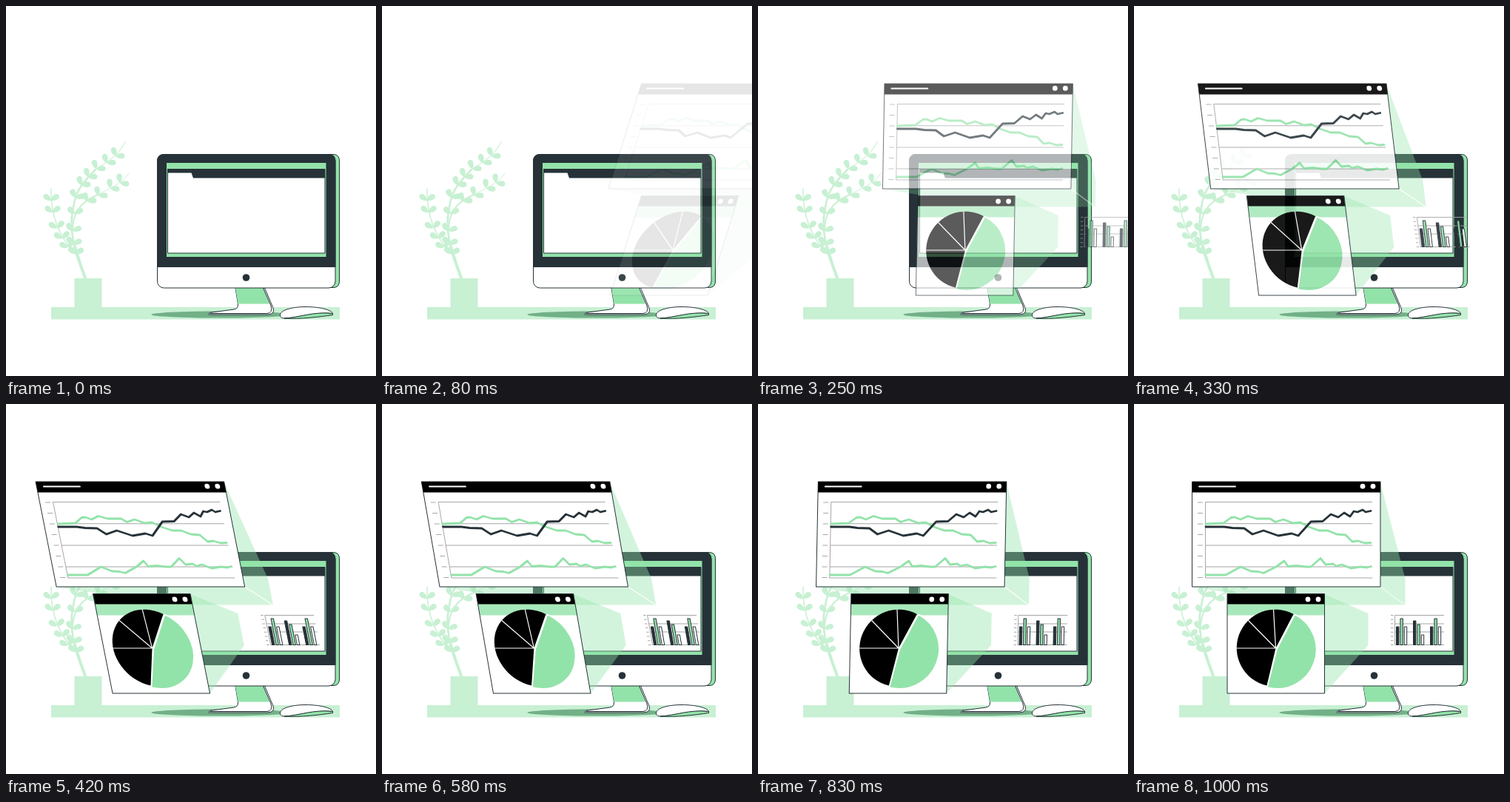
An HTML page for the animation above (1040 ms loop, 500 by 500 pixels).

```html
<!DOCTYPE html>
<html lang="en">
<head>
<meta charset="utf-8">
<title>Desktop dashboard</title>
<style>
html, body { margin: 0; width: 100%; height: 100%; overflow: hidden; background: #fff; }
svg { display: block; width: 100%; height: 100%; }
.d { fill: #263238; }
.g { fill: #92e3a9; }
.w { fill: #fff; }
.ink { stroke: #263238; stroke-width: 1; stroke-linejoin: round; }
.line { fill: none; stroke-width: 2.8; stroke-linecap: round; stroke-linejoin: round; }
.thin { fill: none; stroke: #a6a6a6; stroke-width: 1; }
.stem { fill: none; stroke: #92e3a9; stroke-linecap: round; }
</style>
</head>
<body>
<svg viewBox="0 0 500 500">
  <g opacity=".5">
    <path class="g" d="M61 407H451V423.5H61Z M92.5 368H129.5V412H92.5Z"/>
    <path class="stem" stroke-width="4" d="M107.500 369C103 355 97 342 93 325"/>
    <path class="stem" stroke-width="2.6" d="M94 330C87 305 88 285 91 272C94 250 104 238 121 221"/>
    <path class="stem" stroke-width="1.1" d="M121 221C137 210 151 203 161 184"/>
    <path class="stem" stroke-width="2" d="M90 303C90 280 100 265 124 255"/>
    <path class="stem" stroke-width="1" d="M124 255C140 246 156 241 166 226"/>
    <path class="stem" stroke-width="1.5" d="M100 341C80 322 60 295 61 247"/>
    <g id="leaves" class="g"></g>
  </g>

  <ellipse cx="290" cy="417" rx="93.500" ry="4.500" fill="#72b088"/>

  <g class="ink">
    <path class="w" d="M310 381L313.500 403Q314 409 308 410L278 414Q273 415 274.500 417H354Q364 416 361 408L349.500 381Z"/>
    <path class="g" stroke="none" d="M310 381H348L356 402.500H313.500Z"/>
    <path fill="none" d="M347.500 381L358 405Q361 414.500 353 415.500H276"/>
    <path class="g" d="M436 200.500H442Q450.500 200.500 450.500 209V372Q450.500 380.500 442 380.500H436Z"/>
    <rect class="w" x="204.500" y="200.500" width="240.500" height="180.500" rx="9"/>
    <path class="d" d="M204.500 352.500V209.500Q204.500 200.500 213.500 200.500H436Q445 200.500 445 209.500V352.500Z"/>
  </g>
  <rect class="g" x="217" y="212" width="215.500" height="127"/>
  <rect class="w ink" x="218.500" y="220.500" width="212.500" height="113.500"/>
  <path class="d" d="M218 220H431V232.500H253L250.500 225.500H218Z"/>
  <circle class="d" cx="324.500" cy="367" r="4.800"/>

  <g class="ink">
    <path class="w" d="M370.500 417C372 410 389 406.500 405 406.500C424 406.500 440 410.500 441.500 415.500C420 413 397 421 377 422C372 422 370 420 370.500 417Z"/>
    <path class="g" d="M376 422C397 421 415 412.500 441.500 415.500V417.500C425 420 397 423.500 376 422Z"/>
  </g>

  <g id="panels">
    <g class="g" fill-opacity=".4">
      <path d="M78.500 247L228 271.500H366.500V236L333 106V247Z"/>
      <path d="M257.500 257L316.500 283V326L257.500 391Z"/>
    </g>
    <path stroke="#fff" d="M333 247L366 271.500"/>

    <rect class="w ink" x="78.500" y="105" width="254.500" height="142"/>
    <path d="M78.500 105H333V119.500H78.500Z"/>
    <path stroke="#fff" stroke-width="1.800" stroke-linecap="round" d="M88 111.500H137"/>
    <g class="w">
      <circle cx="309" cy="111.200" r="3.400"/><circle cx="323" cy="111.200" r="3.400"/>
      <circle cx="235" cy="264" r="3.400"/><circle cx="249" cy="264" r="3.400"/>
    </g>
    <path class="thin" d="M322 132.500H96.500V235H322M96.500 161.700H322M96.500 191H322M96.500 220H322"/>
    <path class="thin" id="ticks"/>
    <g class="line" stroke="#92e3a9">
      <path d="M97 162L121 161 131 153.500 136 153 144 156 154 151.500 166 155 184 155 191 159.500 202 156 215 161 225 160 236 166 250 171 262 171 274 176 286 177 295 186 303 185 312 188 320 187.500"/>
      <path d="M97 231H124L144 220 158 226 168 226.500 175 228.500 192 220 203 212 208 219.500 220 218.500 232 220 239 220 252 208.500 259 217 269 216 273 219 281 217 293 222 306 220 315 221 320 219.500"/>
    </g>
    <path class="line" stroke="#263238" d="M97 166H122L133 167.500 149 168 160 176 175 171 195 178 213 175 222 178 239 159 255 158.500 266 149 276 153 284 147 292 152 297 145 302 146 309 143 313 146 320 144.500"/>

    <rect class="w" x="126" y="256.500" width="131.500" height="134.500"/>
    <path class="g" fill-opacity=".8" d="M126 270H257.500V285.500H126Z"/>
    <path d="M126 256.500H257.500V270.500H126Z"/>
    <rect class="ink" fill="none" x="126" y="256.500" width="131.500" height="134.500"/>
    <g class="w">
      <circle cx="235" cy="264" r="3.400"/><circle cx="249" cy="264" r="3.400"/>
    </g>
    <path d="M191.500 330L215.500 284A52 52 0 1 0 179.500 380.500Z"/>
    <path stroke="#fff" stroke-width="1.200" fill="none" d="M139 330H191.500L154.500 292.500M191.500 330L188.500 277.500"/>
    <path class="g" stroke="#fff" stroke-width="1.500" d="M193 331.500L217.500 284.500A53 53 0 0 1 180 383Z"/>

    <path class="thin" d="M419 285.500H352.500V325.500H419M352.500 297H419M352.500 308H419"/>
    <path class="thin" id="barTicks"/>
    <g id="bars" class="ink"></g>
  </g>
</svg>
<script>
const $ = id => document.getElementById(id);

// Leaf pairs: x, y and direction of the stem in degrees
const pairs = [
  [148, 203, 35], [136, 212, 35], [122, 220, 35], [111, 231, 35], [102, 242, 32], [94, 259, 25],
  [154, 239, 45], [141, 246, 45], [125, 256, 38], [110, 264, 30], [93, 281, 5],
  [90, 304, 15], [91, 322, 10], [94, 335, 5],
  [61, 263, 0], [63, 279, 0], [69, 300, -8], [76, 314, -8], [84, 326, -15]
];
const leaf = (x, y, a) =>
  `<path transform="translate(${x} ${y}) rotate(${a})" d="M0 0C-4 -3 -6 -12 0 -12.500S4 -3 0 0"/>`;
$('leaves').innerHTML = pairs.map(([x, y, a]) => leaf(x, y, a - 52) + leaf(x, y, a + 52)).join('');

const ticks = (x, y, w, step) =>
  Array.from({ length: 8 }, (_, i) => `M${x} ${y + i * step}h${w}`).join('');
$('ticks').setAttribute('d', ticks(86, 133, 7, 14.5));
$('barTicks').setAttribute('d', ticks(347, 285.5, 3.5, 5.7));

const tops = [[301, 290, 301], [293, 298, 312], [301, 290, 301]];
$('bars').innerHTML = tops.map((group, i) => group.map((y, j) =>
  `<rect class="${'dgw'[j]}" x="${354.5 + i * 23 + j * 5.4}" y="${y}" width="3.4" height="${325.5 - y}"/>`
).join('')).join('');

// cubic-bezier(.36, -.01, .5, 1.38)
function ease(x) {
  const curve = (s, a, b) => 3 * (1 - s) ** 2 * s * a + 3 * (1 - s) * s * s * b + s ** 3;
  let lo = 0, hi = 1;
  for (let i = 0; i < 24; i++) {
    const mid = (lo + hi) / 2;
    if (curve(mid, .36, .5) < x) lo = mid; else hi = mid;
  }
  return curve(lo, -.01, 1.38);
}

const LOOP = 1040, STEP = 1000 / 24;
const tan = deg => Math.tan(deg * Math.PI / 180);
const mix = (a, b, p) => a + (b - a) * p;

function draw(now) {
  // The motion advances in 24 steps a second
  const step = Math.floor((now % LOOP + 4) / STEP);
  const t = Math.min(1000, 11 + step * 43);
  let slant, shift = 0, alpha = 1;
  if (t < 600) {
    const p = ease(t / 600);
    slant = mix(tan(-20), tan(10), p);
    shift = mix(250, 0, p);
    alpha = step < 2 ? 0 : Math.min(1, p);
  } else if (t < 800) {
    slant = tan(mix(10, -2, ease((t - 600) / 200)));
  } else {
    slant = tan(mix(-2, 0, ease((t - 800) / 200)));
  }
  $('panels').setAttribute('transform', `matrix(1 0 ${slant} 1 ${shift - 250 * slant} 0)`);
  $('panels').setAttribute('opacity', alpha);
}

const start = performance.now();
function tick() {
  draw(performance.now() - start);
  requestAnimationFrame(tick);
}
tick();
</script>
</body>
</html>
```
